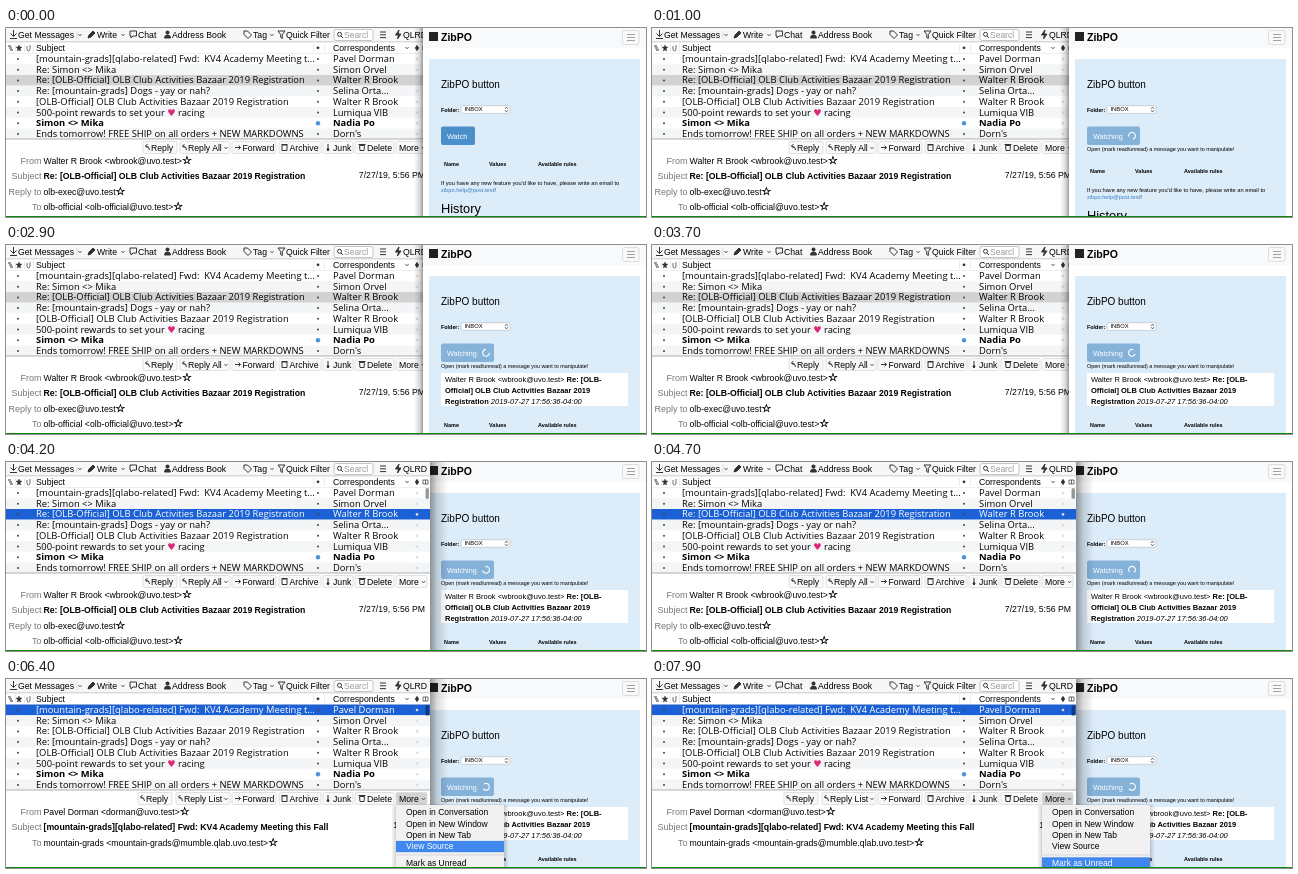
Animation of 640 by 189 pixels, one loop 8 s. Source, as an HTML page:

```html
<!DOCTYPE html>
<html lang="en">
<head>
<meta charset="utf-8">
<title>Mail and button demo</title>
<style>
html, body { margin: 0; width: 100%; height: 100%; overflow: hidden; background: #fff; }
svg { display: block; width: 100%; height: 100%; }
text { font-family: "Liberation Sans", Arial, sans-serif; white-space: pre; }
.list text { font-family: "Open Sans", "Noto Sans", sans-serif; }
.symbol { font-family: "DejaVu Sans", sans-serif; }
.icon { fill: none; stroke: #333; stroke-width: 1; }
.solid { fill: #333; }
</style>
</head>
<body>
<svg id="stage" viewBox="0 0 640 189"></svg>
<script>
const LOOP = 8000;
const WATCH = 600, CARD = 2800, FOCUS = 4200, SELECT_FIRST = 5200, MENU = 6100;
const MENU_STEPS = [6150, 6200, 6300, 6400, 7200];
const ROW_TOP = 25.6, ROW_HEIGHT = 10.7;

const escapeText = s => s.replace(/&/g, '&amp;').replace(/</g, '&lt;').replace(/>/g, '&gt;')
  .replace('♥', '<tspan class="symbol" fill="#dc2878">♥</tspan>')
  .replace('☆', '<tspan class="symbol" font-size="11" stroke="#000" stroke-width=".4">☆</tspan>');
const text = (x, y, s, size = 8.7, attrs = '') =>
  `<text x="${x}" y="${y}" font-size="${size}" ${attrs}>${escapeText(s)}</text>`;
const rect = (x, y, w, h, fill, attrs = '') =>
  `<rect x="${x}" y="${y}" width="${w}" height="${h}" fill="${fill}" ${attrs}/>`;
const icon = (d, style = '', kind = '') => `<path class="icon ${kind}" d="${d}" style="${style}"/>`;
const caret = (x, y) => icon(`M${x - 1.6} ${y - 1}l1.6 1.8l1.6-1.8`, 'stroke-width:.8');
const dot = (x, y, r, fill) => `<circle cx="${x}" cy="${y}" r="${r}" fill="${fill}"/>`;
const group = (id, content, attrs = '') => `<g id="${id}" ${attrs}>${content}</g>`;
const BOLD = 'font-weight="700"', END = 'text-anchor="end"';

const EVENT = '[OLB-Official] OLB Club Activities Bazaar 2019 Registration';
const rows = [
  ['[mountain-grads][qlabo-related] Fwd:  KV4 Academy Meeting t...', 'Pavel Dorman'],
  ['Re: Simon <> Mika', 'Simon Orvel'],
  ['Re: ' + EVENT, 'Walter R Brook'],
  ['Re: [mountain-grads] Dogs - yay or nah?', 'Selina Orta...'],
  [EVENT, 'Walter R Brook'],
  ['500-point rewards to set your ♥ racing', 'Lumiqua VIB'],
  ['Simon <> Mika', 'Nadia Po'],
  ['Ends tomorrow! FREE SHIP on all orders + NEW MARKDOWNS', "Dorn's"],
];
const stripe = i => i % 2 ? '#f4f5f6' : '#fff';

function toolbar() {
  return rect(0, 0, 424, 14, '#f7f7f7') + rect(0, 13.5, 424, 1, '#bdbdbd')
    + icon('M7.5 2v6M4.5 5.5l3 3l3-3M4 10.5h7')
    + text(12, 10, 'Get Messages') + icon('M71 3v8', 'stroke:#ddd') + caret(74, 7)
    + icon('M82 10l1-3l4-4l2 2l-4 4z', '', 'solid') + text(91, 10, 'Write') + caret(117, 7)
    + icon('M124 3h6.5v5h-3.5l-2 2v-2h-1z') + text(132, 10, 'Chat')
    + dot(161.5, 4.5, 2, '#333') + icon('M158.5 10q0-3 3-3t3 3z', '', 'solid')
    + text(166, 10, 'Address Book')
    + icon('M238 3h3.5l4 4l-3.5 3.5l-4-4z') + text(247, 10, 'Tag') + caret(266, 7)
    + icon('M272 3h7l-2.7 3.5v4l-1.6-1v-3z') + text(280, 10, 'Quick Filter')
    + rect(328, 1.5, 39, 11, '#fff', 'stroke="#c6c6c6" rx="2"')
    + '<circle class="icon" cx="333.5" cy="6.3" r="2"/>' + icon('M335 8l2 2')
    + text(338, 10, 'Searcl', 8.5, 'fill="#999"')
    + icon('M374 4h6M374 6.8h6M374 9.6h6')
    + icon('M393 2l-3.5 5h3l-1 4l3.5-5h-3z', '', 'solid')
    + text(397, 10, 'QLRD');
}

function listHeader() {
  return rect(0, 14.5, 424, 11, '#fff') + rect(0, 25, 424, .6, '#cfcfcf')
    + icon('M2 18h3M3 20h3M4 22h3') + icon('M13 17l1 2h2l-2 2l1 2l-2-1l-2 1l1-2l-2-2h2z', 'stroke-width:.4', 'solid')
    + icon('M21 18v4q1.5 2 3 0v-5', 'stroke-width:.7')
    + text(30, 22.8, 'Subject') + text(327, 22.8, 'Correspondents') + dot(312, 19.8, 1.4, '#333')
    + caret(401, 20) + icon('M411 22.5q-3-2.5 0-5q3 2.5 0 5z', '', 'solid')
    + icon('M417 18h5v4h-5zM419.5 18v4', 'stroke-width:.7')
    + [9, 18, 27, 307, 318].map(x => rect(x, 16, .6, 8, '#ddd')).join('');
}

function threadRow([subject, person], i) {
  const y = ROW_TOP + i * ROW_HEIGHT, unread = i === 6;
  const weight = `font-weight="${unread ? 700 : 500}"`;
  return group('row' + i, rect(0, y, 424, ROW_HEIGHT, stripe(i))
    + dot(12, y + 5.4, 1, '#444') + dot(312, y + 5.4, unread ? 2.2 : 1, unread ? '#4b94d8' : '#444')
    + dot(411, y + 5.4, 1.3, '#ddd')
    + text(30, y + 8.4, subject, 9.4, weight) + text(327, y + 8.4, person, 9.4, weight));
}

const button = (x, w, label, labelX) =>
  rect(x, 113.5, w, 12, '#f9f9f9', 'stroke="#dadada" stroke-width=".8" rx="1.5"') + text(labelX, 122.7, label);
const replyIcon = x => icon(`M${x + 4.5} 122q0-4-4-4m2-2l-2 2l2 2`);

function messageButtons() {
  return rect(0, 111, 424, 78, '#fff') + rect(0, 110.5, 424, 1, '#b0b0b0')
    + button(226, 44, 'Forward', 236.5) + icon('M229 119.5h5.5m-2-2l2 2l-2 2')
    + button(273, 42, 'Archive', 283.5) + icon('M276 117h5v5.5h-5zM275.5 116.5h6')
    + button(317, 30, 'Junk', 327) + icon('M322 116v4q-2 2 0 3q2-1 0-3', '', 'solid')
    + button(349, 39, 'Delete', 361) + icon('M353.5 117.5h5l-.5 5h-4zM352.5 116.5h7')
    + group('more', button(390, 31, 'More', 393)) + caret(417.5, 120);
}

function replyButtons(replyX, allX, label) {
  return button(replyX - 8, 34, 'Reply', replyX) + replyIcon(replyX - 6)
    + button(allX - 8, 224 - allX + 8, label, allX) + replyIcon(allX - 6) + caret(220, 120);
}

const field = (y, label, value, weight = '') =>
  text(35.5, y, label, 9, END + ' fill="#777"') + text(37.5, y, value, 8.7, weight);

function messageHeaders() {
  return group('eventMail', replyButtons(145, 182, 'Reply All')
      + field(136, 'From', 'Walter R Brook <wbrook@uvo.test>☆')
      + field(151, 'Subject', 'Re: ' + EVENT, BOLD)
      + field(167, 'Reply to', 'olb-exec@uvo.test☆')
      + field(182, 'To', 'olb-official <olb-official@uvo.test>☆')
      + text(419, 149.5, '7/27/19, 5:56 PM', 8.7, END))
    + group('meetingMail', replyButtons(140, 178, 'Reply List')
      + field(136, 'From', 'Pavel Dorman <dorman@uvo.test>☆')
      + field(151, 'Subject', '[mountain-grads][qlabo-related] Fwd: KV4 Academy Meeting this Fall', BOLD)
      + field(167, 'To', 'mountain-grads <mountain-grads@mumble.qlab.uvo.test>☆')
      + text(419, 149, '1:45 AM', 8.7, END));
}

function browser() {
  const nav = rect(417, 0, 223, 20, '#f8f9fa') + rect(423, 4, 9, 9, '#222')
    + text(435, 13, 'ZibPO', 10.5, BOLD)
    + rect(616.5, 2.5, 16.5, 14, 'none', 'rx="2" stroke="#d5d6d7" stroke-width=".8"')
    + icon('M621 6.5h8M621 9.5h8M621 12.5h8', 'stroke:#999;stroke-width:.9');
  const form = rect(423, 31, 211, 157, '#dcecf9') + text(435, 59.5, 'ZibPO button', 10)
    + text(435, 83.5, 'Folder:', 5.4, BOLD)
    + rect(455, 77.7, 49, 7.6, '#fff', 'rx="1.5" stroke="#b0b8c0" stroke-width=".6"')
    + text(458.5, 83.4, 'INBOX', 5.8) + icon('M499 80.8l1.5-1.7l1.5 1.7M499 82.2l1.5 1.7l1.5-1.7', 'stroke-width:.8');
  const idle = rect(435, 98.5, 34, 18.5, '#4a8fc9', 'rx="2"') + text(441, 110.5, 'Watch', 7.3, 'fill="#fff"');
  const watching = rect(435, 98.5, 53, 18.5, '#85b2d9', 'rx="2"')
    + text(441, 110.5, 'Watching', 7.2, 'fill="#fff"')
    + '<path id="spinner" d="M2.4 2.4A3.4 3.4 0 1 1 2.4 -2.4" fill="none" stroke="#fff" stroke-width="1.1"/>'
    + text(435, 122.7, 'Open (mark read/unread) a message you want to manipulate!', 5.4);
  const card = rect(435, 128, 187, 33, '#fff')
    + `<text x="439" y="136.5" font-size="7.5">Walter R Brook &lt;wbrook@uvo.test&gt; <tspan ${BOLD}>Re: [OLB-</tspan></text>`
    + text(439, 147.5, 'Official] OLB Club Activities Bazaar 2019', 7.5, BOLD)
    + `<text x="439" y="158.5" font-size="7.5"><tspan ${BOLD}>Registration</tspan> <tspan font-style="italic">2019-07-27 17:56:36-04:00</tspan></text>`;
  const rest = text(438, 138, 'Name', 5.5, BOLD) + text(483, 138, 'Values', 5.5, BOLD)
    + text(532, 138, 'Available rules', 5.5, BOLD)
    + text(435, 157, "If you have any new feature you'd like to have, please write an email to", 5.7)
    + `<text x="435" y="164" font-size="5.7"><tspan fill="#3a7fc0">zibpo.help@post.test</tspan>!</text>`
    + text(435, 185, 'History', 12.8);
  return rect(417, 0, 223, 189, '#fff') + nav + form + group('idle', idle)
    + group('watching', watching) + group('card', card) + group('rest', rest);
}

function menu() {
  const items = ['Open in Conversation', 'Open in New Window', 'Open in New Tab', 'View Source', 'Mark as Unread'];
  const top = i => i < 4 ? 128 + i * 11.3 : 178.3;
  return [1, 2.5, 4].map(d => rect(390 - d, 126 - d / 3, 108 + 2 * d, 70, '#000', 'opacity=".06" rx="3"')).join('')
    + rect(390, 126, 108, 65, '#f1f1f1') + rect(390, 175.5, 108, .9, '#d4d4d4')
    + items.map((s, i) => group('item' + i,
      rect(390, top(i), 108, 11.3, 'none') + text(400, top(i) + 8.4, s, 8.5))).join('');
}

const $ = id => document.getElementById(id);
$('stage').innerHTML = '<clipPath id="mailClip"><rect id="mailArea" height="189"/></clipPath>'
  + '<linearGradient id="fade"><stop stop-opacity=".38"/><stop offset=".4" stop-opacity=".14"/><stop offset="1" stop-opacity="0"/></linearGradient>'
  + browser()
  + group('mail', rect(0, 0, 424, 189, '#fff') + toolbar() + listHeader()
    + group('threads', rows.map(threadRow).join(''), 'class="list"')
    + rect(419.5, 26, 3.5, 11, '#000', 'opacity=".4" rx="1.7"')
    + messageButtons() + messageHeaders(), 'clip-path="url(#mailClip)"')
  + rect(0, 0, 18, 189, 'url(#fade)', 'id="shadow"') + group('menu', menu())
  + rect(0, 188, 640, 1, '#0c8a0c');

const show = (id, on) => $(id).setAttribute('display', on ? 'inline' : 'none');
function paint(id, background, color) {
  $(id).firstElementChild.setAttribute('fill', background);
  $(id).setAttribute('fill', color);
}

function render(t) {
  const focused = t >= FOCUS, first = t >= SELECT_FIRST, width = focused ? 424 : 417;
  $('mailArea').setAttribute('width', width);
  // The window in front casts its shadow on the other one.
  $('shadow').setAttribute('transform', `translate(${width} 0) scale(${focused ? 1 : -.5} 1)`);

  const selected = first ? 0 : 2;
  rows.forEach((_, i) => {
    if (i !== selected) paint('row' + i, stripe(i), '#000');
    else paint('row' + i, focused ? '#1b60d4' : '#d2d2d2', focused ? '#fff' : '#000');
  });
  show('eventMail', !first);
  show('meetingMail', first);

  show('idle', t < WATCH);
  show('watching', t >= WATCH);
  show('card', t >= CARD);
  $('rest').setAttribute('transform', `translate(0 ${t < WATCH ? 0 : t < CARD ? 7 : 44})`);
  $('spinner').setAttribute('transform', `translate(480 107.8) rotate(${t / 750 * 360})`);

  show('menu', t >= MENU);
  paint('more', t >= MENU ? '#d2d2d2' : '#f9f9f9', '#000');
  const active = MENU_STEPS.filter(start => t >= start).length - 1;
  MENU_STEPS.forEach((_, i) => paint('item' + i, i === active ? '#4087ee' : 'none', i === active ? '#fff' : '#000'));
}

const start = performance.now();
function tick() {
  render((performance.now() - start) % LOOP);
  requestAnimationFrame(tick);
}
tick();
</script>
</body>
</html>
```
